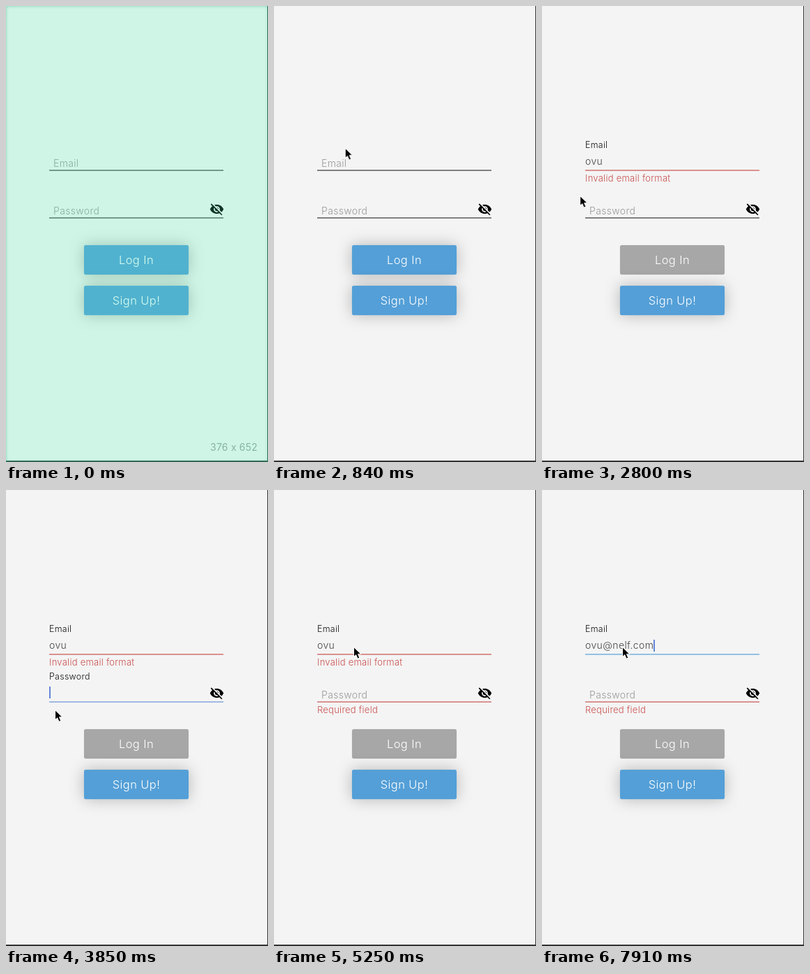
An HTML page for the animation above (8000 ms loop, 376 by 652 pixels).

```html
<!DOCTYPE html>
<html lang="en">
<head>
<meta charset="utf-8">
<title>Login form</title>
<style>
  :root {
    --bg: #f4f4f4; --blue: #549fd7; --red: #c9504f; --ink: #333; --loop: 8s infinite;
    --glow: 0 0 1px var(--blue), 0 0 22px rgba(0, 0, 0, .26);
  }
  html, body { margin: 0; width: 100%; height: 100%; overflow: hidden; background: var(--bg); }
  #stage {
    position: relative; width: 376px; height: 652px; overflow: hidden;
    background: var(--bg); font-family: Inter, "Open Sans", sans-serif; font-weight: 300; white-space: pre;
  }
  #stage > *, .field > * { position: absolute; }

  .field { left: 62px; width: 250px; height: 70px; }
  #email { top: 190px; }
  #pass { top: 258px; }
  .label {
    left: 0; top: .5px; font-size: 12.4px; line-height: 16px; letter-spacing: .3px;
    transform-origin: 0 50%;
  }
  .line { left: 0; top: 44px; width: 100%; height: 2px; opacity: .6; background: currentColor; }
  .error { left: 0; top: 48px; font-size: 13px; line-height: 17px; letter-spacing: .25px; color: var(--red); }
  .value, .hint { left: 0; top: 23px; font-size: 14px; line-height: 18px; letter-spacing: .4px; }
  .value { color: #444; }
  .hint { left: 1px; color: #bebebe; }
  .caret { display: inline-block; width: 2px; height: 17px; vertical-align: -4px; background: #6286d8; }
  #pass .caret { position: absolute; left: 0; top: 23px; }

  .button {
    left: 112px; width: 150px; height: 42px; border-radius: 3px; background: var(--blue);
    box-shadow: var(--glow); color: #fff;
    font-size: 16.5px; line-height: 43px; letter-spacing: .4px; text-align: center;
  }
  #login { top: 342px; animation: disable var(--loop) step-end; }
  #signup { top: 400px; }
  #eye { left: 292px; top: 280px; }

  .touch {
    width: 40px; height: 40px; border: 1px solid #aaa; border-radius: 50%; box-sizing: border-box;
    background: rgba(208, 208, 208, .8); box-shadow: 2px 4px 8px rgba(0, 0, 0, .2);
    animation: touch var(--loop) linear;
  }
  #cursor { left: 0; top: 0; animation: move var(--loop) ease-in-out, cursor-on var(--loop) step-end; }
  .edge { inset: 0; border: solid #333; border-width: 0 1px 2px 0; }
  #tint {
    inset: 0; background: rgba(70, 249, 178, .213); box-shadow: inset 0 0 4px rgba(40, 170, 125, .5);
    animation: flash var(--loop) step-end;
  }
  #size {
    position: absolute; right: 15px; bottom: 12px; color: #86b3a3;
    font-size: 14px; font-weight: 400; line-height: 18px; letter-spacing: .2px;
  }

  #email .label { animation: email-label var(--loop) ease-out; }
  #email .line { animation: email-line var(--loop) step-end; }
  #email .error { animation: email-error var(--loop) step-end; }
  #email .hint { animation: hint var(--loop) step-end; }
  #email .caret { animation: email-caret var(--loop) step-end; }
  #email .value::before { content: ""; animation: typing var(--loop) step-end; }
  #pass .label { animation: pass-label var(--loop) ease-out; }
  #pass .line { animation: pass-line var(--loop) step-end; }
  #pass .error { animation: pass-error var(--loop) step-end; }
  #pass .caret { animation: pass-caret var(--loop) step-end; }

  @keyframes flash { 0% { opacity: 1; } .875%, 100% { opacity: 0; } }
  @keyframes cursor-on { 0% { opacity: 0; } .875%, 100% { opacity: 1; } }

  @keyframes email-label {
    0%, 13.5% { transform: translate(6px, 26.5px) scale(1.13); color: #999; }
    15.75%, 100% { transform: none; color: #111; }
  }
  @keyframes email-line {
    0% { color: var(--ink); }
    14.875% { color: var(--blue); }
    35% { color: var(--red); }
    67.375%, 100% { color: var(--blue); }
  }
  @keyframes email-error { 0% { opacity: 0; } 35% { opacity: 1; } 67.375%, 100% { opacity: 0; } }
  @keyframes hint { 0% { opacity: 0; } 14.875% { opacity: 1; } 22.75%, 100% { opacity: 0; } }
  @keyframes email-caret {
    0% { opacity: 0; }
    14.875% { opacity: 1; }
    21% { opacity: .55; }
    22.75% { opacity: 1; }
    35% { opacity: 0; }
    68.25%, 100% { opacity: 1; }
  }
  @keyframes typing {
    0% { content: ""; }
    22.75% { content: "o"; }
    24.5% { content: "ov"; }
    27.125% { content: "ovu"; }
    78.75% { content: "ovu@"; }
    87.5% { content: "ovu@n"; }
    92.75% { content: "ovu@nel"; }
    93.625% { content: "ovu@nelf"; }
    96.25% { content: "ovu@nelf."; }
    97.125% { content: "ovu@nelf.c"; }
    98.875%, 100% { content: "ovu@nelf.com"; }
  }
  @keyframes disable {
    0% { background: var(--blue); box-shadow: var(--glow); }
    22.75%, 100% { background: #a7a7a7; box-shadow: 0 0 1px #a7a7a7; }
  }

  @keyframes pass-label {
    0%, 41.125%, 56%, 100% { transform: translate(6px, 26.5px) scale(1.13); color: #999; }
    43.3%, 53.9% { transform: none; color: #111; }
  }
  @keyframes pass-line {
    0% { color: var(--ink); }
    42% { color: #6a8fd6; }
    54.25%, 100% { color: var(--red); }
  }
  @keyframes pass-error { 0% { opacity: 0; } 54.25%, 100% { opacity: 1; } }
  @keyframes pass-caret { 0% { opacity: 0; } 42% { opacity: 1; } 54.25%, 100% { opacity: 0; } }

  @keyframes touch {
    0%, 72.6% { opacity: 0; }
    76%, 80% { opacity: 1; }
    81.375%, 100% { opacity: 0; }
  }
  @keyframes move {
    0%, .875% { transform: translate(190px, 649px); }
    7%, 7.9% { transform: translate(141px, 229px); }
    9.8% { transform: translate(98px, 198px); }
    12.25%, 28.875% { transform: translate(119px, 225px); }
    32.375%, 33.25% { transform: translate(70px, 268px); }
    34.125% { transform: translate(48px, 273px); }
    35.875%, 38.5% { transform: translate(60px, 269px); }
    41.125%, 44% { transform: translate(100px, 284px); }
    48.125% { transform: translate(70px, 314px); }
    49%, 51.6% { transform: translate(58px, 326px); }
    53.4%, 58% { transform: translate(37px, 318px); }
    62.125% { transform: translate(70px, 290px); }
    65.625%, 69.125% { transform: translate(114px, 224px); }
    70%, 100% { transform: translate(115px, 224px); }
  }
</style>
</head>
<body>
<div id="stage">
  <div id="email" class="field">
    <div class="label">Email</div>
    <div class="hint">e.g., nomil@vumarn.com</div>
    <div class="value"><span class="caret"></span></div>
    <div class="line"></div>
    <div class="error">Invalid email format</div>
  </div>
  <div id="pass" class="field">
    <div class="label">Password</div>
    <span class="caret"></span>
    <div class="line"></div>
    <div class="error">Required field</div>
  </div>
  <svg id="eye" width="21" height="21" viewBox="0 0 24 24">
    <path d="M1 12C2.7 7.6 7 4.5 12 4.5S21.3 7.6 23 12C21.3 16.4 17 19.5 12 19.5S2.7 16.4 1 12Z"/>
    <circle cx="12" cy="12" r="5" fill="#f4f4f4"/>
    <circle cx="12" cy="12" r="3"/>
    <path d="M4 2.4 22 20.4" stroke="#f4f4f4" stroke-width="1.9"/>
    <path d="M2.6 3.6 20.4 21.4" stroke="#000" stroke-width="1.9"/>
  </svg>
  <div id="login" class="button">Log In</div>
  <div id="signup" class="button">Sign Up!</div>
  <div class="touch" style="left:95px;top:204px"></div>
  <div class="touch" style="left:240px;top:389px"></div>
  <svg id="cursor" width="14" height="20" viewBox="0 0 14 20">
    <path d="M.5 .7V14.6L3.7 11.7 6 17.2 8.8 16 6.5 10.7H11Z" stroke="#fff" stroke-width="1"/>
  </svg>
  <div class="edge"></div>
  <div id="tint"><span id="size">376 x 652</span></div>
</div>
</body>
</html>
```
